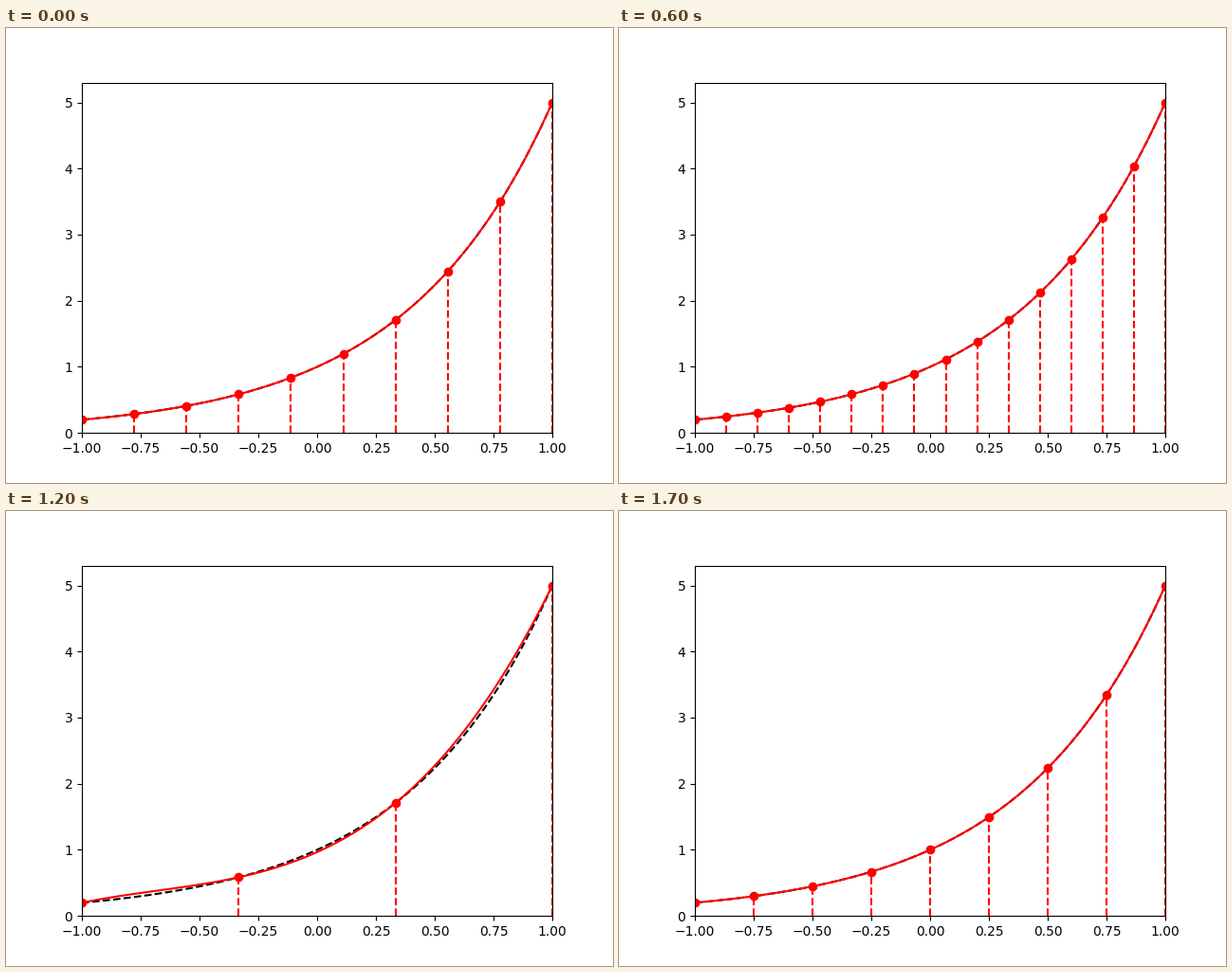
These frames come from a looping animation (640 by 480 pixels, 1800 ms). A matplotlib script:

```python
import numpy as np
import matplotlib.pyplot as plt
from matplotlib.animation import FuncAnimation

STEPS = 18
INTERVAL = 100
FIRST_COUNT = 10
MIN_COUNT = 2


def func(x):
    return 5.0 ** x


def lagrange(nodes, values, x):
    """Evaluate the polynomial through (nodes, values) at x."""
    total = np.zeros_like(x)
    for i, (node, value) in enumerate(zip(nodes, values)):
        others = np.delete(nodes, i)
        basis = np.prod((x[:, None] - others) / (node - others), axis=1)
        total += value * basis
    return total


fig, ax = plt.subplots(figsize=(6.4, 4.8), dpi=100)
ax.set_xlim(-1, 1)
ax.set_ylim(0, 5.3)

grid = np.linspace(-1, 1, 200)
ax.plot(grid, func(grid), "k--")
curve, = ax.plot([], [], "r-")
dots, = ax.plot([], [], "ro")
stems = ax.vlines([-1, 1], 0, [func(-1), func(1)], colors="r",
                  linestyles="dashed")


def draw(step):
    # The node count grows by one each step and wraps from 19 back to 2.
    count = MIN_COUNT + (step + FIRST_COUNT - MIN_COUNT) % STEPS
    nodes = np.linspace(-1, 1, count)
    values = func(nodes)
    curve.set_data(grid, lagrange(nodes, values, grid))
    dots.set_data(nodes, values)
    stems.set_segments([[(x, 0), (x, y)] for x, y in zip(nodes, values)])
    return curve, dots, stems


anim = FuncAnimation(fig, draw, frames=STEPS, interval=INTERVAL, repeat=True)
plt.show()
```
